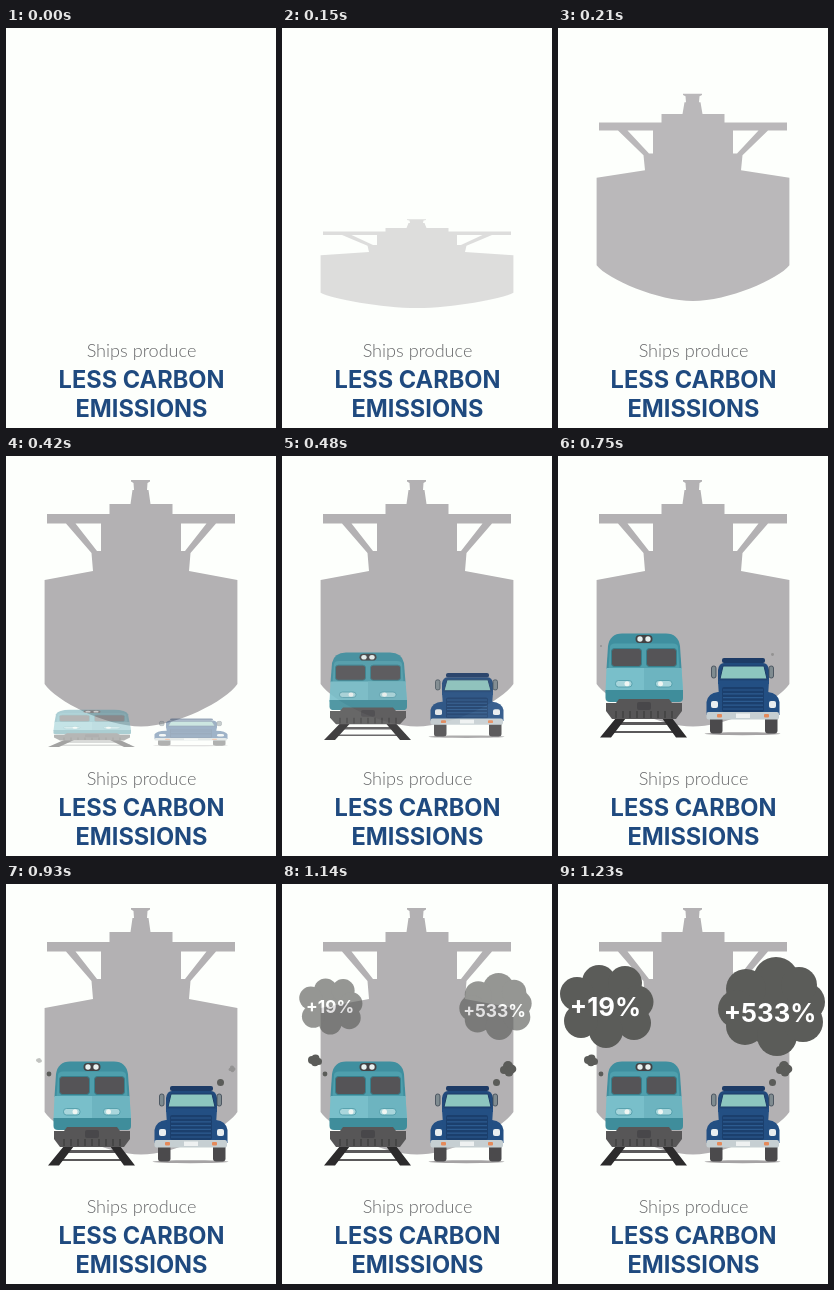
Recreate the animation shown at these times as an HTML page. Size 270 by 400 pixels, loop 1.44 s.

```html
<!DOCTYPE html>
<html lang="en">
<head>
<meta charset="utf-8">
<title>Ships produce less carbon emissions</title>
<style>
  html, body { margin: 0; width: 100%; height: 100%; overflow: hidden; background: #fdfffc; }
  svg { display: block; width: 100vw; height: 100vh; }
  text { text-anchor: middle; }
  .lead { font: 300 18.1px Lato, sans-serif; fill: #666769; }
  .claim { font: 700 23.6px Inter, sans-serif; fill: #1f4a7f; }
  .figure { font: 700 25.7px Inter, sans-serif; fill: #fff; }
</style>
</head>
<body>
<svg viewBox="0 0 270 400">
  <rect width="270" height="400" fill="#fdfffc"/>

  <g id="ship" fill="#b3b1b3">
    <path d="M125 24H144V25.500L141.500 27L141 34H142.500L144.500 48H166.500V58H229V67.500H210L184.500 97L183 115L231.400 124V228C220 245 170 270.500 135 270.500S50 245 38.600 228V124L87 115L85.500 97L60 67.500H41V58H103.500V48H124.500L126.500 34H128L127.500 27L125 25.500Z"/>
    <path d="M69.500 67.500H95V95H91ZM200.500 67.500H175V95H179Z" fill="#fdfffc"/>
  </g>

  <g id="vehicles">
    <g id="train">
      <path d="M48 275H124V277H48ZM56 266H116V269H56Z" fill="#5a595a"/>
      <path d="M58 262H68L53 281.500H42ZM104 262H114L129 281.500H118Z" fill="#2c2b2c"/>
      <path d="M48.500 213L50 190Q52 177.500 64 177.500H108Q120 177.500 122 190L123.500 213Z" fill="#3f8f9f"/>
      <path d="M50.500 213L52 191Q52.500 187.500 57 187.500H115Q119.500 187.500 120 191L121.500 213Z" fill="#4e9fad"/>
      <rect x="77.500" y="179" width="17" height="8" rx="4" fill="#434244"/>
      <g fill="#e9f1f0"><circle cx="82" cy="183" r="2.700"/><circle cx="90" cy="183" r="2.700"/></g>
      <g fill="#555457" stroke="#37808d"><rect x="53.500" y="192.500" width="30" height="18" rx="3"/><rect x="88.500" y="192.500" width="30" height="18" rx="3"/></g>
      <path d="M48.500 212H123.500L125 236H47.500Z" fill="#79bfca"/>
      <path d="M86 212H123.500L125 236H86Z" fill="#6db4c0"/>
      <path d="M47.500 234H125V242Q125 246 121 246H52Q47.500 246 47.500 242Z" fill="#3f8d9b"/>
      <g fill="#a9d6dc" stroke="#4b98a5" stroke-width=".8"><rect x="57.500" y="224.500" width="16.500" height="6.500" rx="3"/><rect x="97.500" y="224.500" width="16.500" height="6.500" rx="3"/></g>
      <g fill="#f0f6f3"><circle cx="69" cy="227.700" r="2.500"/><circle cx="102.500" cy="227.700" r="2.500"/></g>
      <path d="M48 247H58L61 243H111L114 247H124V255L118 263H54L48 255Z" fill="#575657"/>
      <path id="grille" stroke="#424142" stroke-width="1.500"/>
      <rect x="79" y="246" width="14" height="8" rx="2" fill="#48474a"/>
    </g>

    <g id="truck">
      <ellipse cx="184.500" cy="277.700" rx="38" ry="1.500" fill="#a5a3a4"/>
      <g fill="#4b4a4c"><rect x="152" y="260" width="12.500" height="17.500" rx="3"/><rect x="207" y="260" width="12.500" height="17.500" rx="3"/></g>
      <path d="M160 228V214Q161 207 166 207H205Q210 207 211 214V228Z" fill="#214a7c"/>
      <rect x="164" y="202" width="43" height="5" rx="2" fill="#1d3b66"/>
      <path d="M165 210H206L209 223H162Z" fill="#8dc6bf" stroke="#1d3b66"/>
      <g fill="#7f8b90" stroke="#3b4753" stroke-width=".8"><rect x="153.500" y="210" width="4.500" height="12" rx="2"/><rect x="211" y="210" width="4.500" height="12" rx="2"/></g>
      <path d="M148.500 259V246Q150 237 160 236H210Q220 237 221.500 246V259Z" fill="#234f83"/>
      <path d="M160 225H211L209 257H162Z" fill="#234f83"/>
      <rect x="164" y="231" width="42" height="25" rx="2" fill="#1b3f6d"/>
      <path id="vents" stroke="#2c5b90" stroke-width="1.200"/>
      <g fill="#e9eef0"><rect x="153" y="245" width="7" height="7" rx="2"/><rect x="211" y="245" width="7" height="7" rx="2"/></g>
      <rect x="148.500" y="256" width="72.500" height="7.500" rx="2" fill="#c6cfd2"/>
      <g fill="#e58a5a"><rect x="159" y="258" width="5" height="3.500" rx="1"/><rect x="206" y="258" width="5" height="3.500" rx="1"/></g>
      <rect x="178" y="257.500" width="14" height="4.500" fill="#eef1f1"/>
    </g>
  </g>

  <g id="smoke" fill="#5b5c59"></g>

  <text class="lead" x="135.500" y="329">Ships produce</text>
  <text class="claim" x="135.500" y="360">LESS CARBON</text>
  <text class="claim" x="135.500" y="389">EMISSIONS</text>
</svg>

<script>
  const LOOP = 1440, TICK = 30, STEPS = 5;
  const $ = id => document.getElementById(id);
  const easeOut = (p, power) => 1 - Math.pow(1 - p, power);

  const stripes = (count, line) => Array.from({ length: count }, (_, i) => line(i)).join('');
  $('grille').setAttribute('d', stripes(9, i => `M${58 + i * 7} 255V262`));
  $('vents').setAttribute('d', stripes(6, i => `M165 ${234 + i * 3.8}H205`));

  // Each puff is a list of [x, y, r] circles.
  function addPuff(circles, label) {
    const puff = document.createElementNS('http://www.w3.org/2000/svg', 'g');
    puff.innerHTML = circles.map(([x, y, r]) => `<circle cx="${x}" cy="${y}" r="${r}"/>`).join('');
    if (label) {
      const [text, x, y] = label;
      puff.innerHTML += `<text class="figure" x="${x}" y="${y}">${text}</text>`;
    }
    $('smoke').append(puff);
    return puff;
  }

  const smallLeft = addPuff([[43, 190, 2.4]]);
  const smallRight = addPuff([[214.5, 198.5, 3.5]]);
  const midLeft = addPuff([[30, 176, 4], [33.5, 174.5, 4], [36.5, 177.5, 3.5], [33, 178.5, 3.8]]);
  const midRight = addPuff([[226, 182, 5], [222, 186, 4], [227, 188, 4.5], [230, 185, 4.3]]);
  const bigLeft = addPuff(
    [[49, 122, 33], [41, 98, 17], [67, 99, 17], [79, 118, 16.5], [76, 139, 17], [48, 147, 17], [23, 137, 17], [19, 110, 17]],
    ['+19%', 47.5, 132]);
  const bigRight = addPuff(
    [[213, 123, 37], [218, 96, 23], [188, 105, 20], [179, 125, 19], [187, 142, 19], [219, 152, 20], [245, 138, 20], [248, 118, 19], [241, 101, 18]],
    ['+533%', 212, 137.5]);

  function reveal(node, opacity, transform) {
    node.setAttribute('opacity', opacity);
    node.setAttribute('visibility', opacity > 0 ? 'visible' : 'hidden');
    node.setAttribute('transform', transform);
  }
  function grow(node, p, base) {
    const e = easeOut(p, 2);
    reveal(node, easeOut(p, 2.5),
      `translate(0 ${base + 15 * (1 - e)}) scale(1 ${e}) translate(0 ${-base})`);
  }
  function pop(node, p, x, y) {
    const e = easeOut(p, 2);
    reveal(node, e, `translate(${x} ${y}) scale(${0.1 + 0.9 * e}) translate(${-x} ${-y})`);
  }

  function draw(time) {
    const tick = Math.floor((time % LOOP) / TICK);
    const progress = start => Math.min(1, Math.max(0, (tick - start / TICK + 1) / STEPS));
    grow($('ship'), progress(150), 270.5);
    grow($('vehicles'), progress(420), 281.5);
    pop(smallLeft, progress(750), 43, 190);
    pop(smallRight, progress(750), 214.5, 198.5);
    pop(midLeft, progress(930), 33, 176.5);
    pop(midRight, progress(930), 226, 185);
    pop(bigLeft, progress(1110), 49, 122.5);
    pop(bigRight, progress(1110), 213.5, 122.5);
  }

  const began = performance.now();
  function frame() {
    draw(performance.now() - began);
    requestAnimationFrame(frame);
  }
  frame();
</script>
</body>
</html>
```
